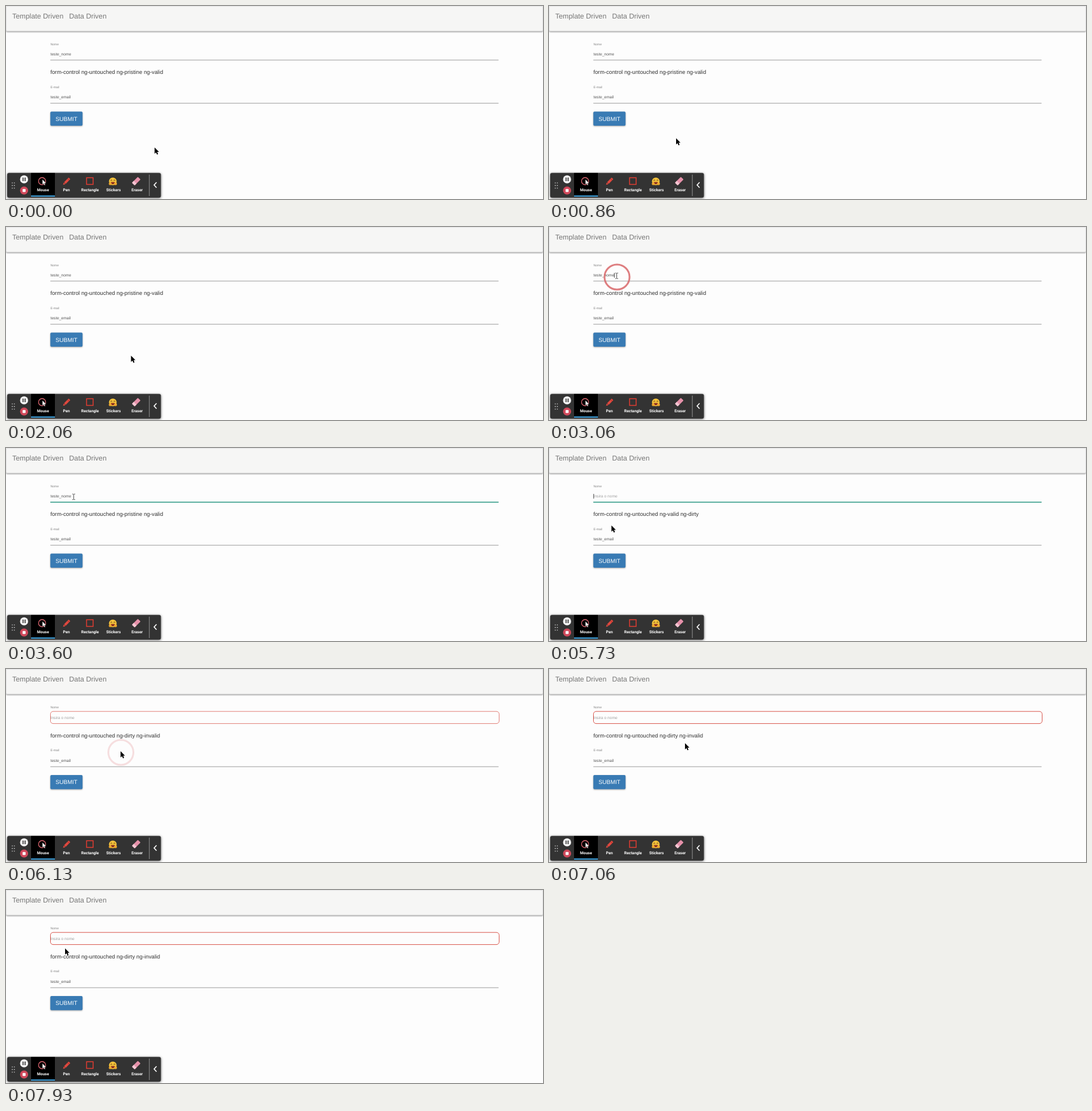
Animation, 900 px wide and 324 px high, one loop 8000 ms. Source, as an HTML page:

```html
<!DOCTYPE html>
<html lang="pt">
<head>
<meta charset="utf-8">
<title>Form states</title>
<style>
  html, body { margin: 0; width: 100%; height: 100%; overflow: hidden; background: #fdfdfd; }
  svg { display: block; width: 900px; height: 324px; }
  text { font-family: "Liberation Sans", Arial, sans-serif; text-rendering: geometricPrecision; white-space: pre; }
  .nav text { font-size: 11.88px; fill: #777; }
  .label { font-size: 5.28px; fill: #858585; }
  .field { font-size: 6.6px; fill: #555; }
  .status { font-size: 9.24px; fill: #333; }
  .tools text { font: bold 6.6px Roboto, sans-serif; fill: #fff; text-anchor: middle; }
  .panel { filter: drop-shadow(0 1px 2px #0009); }
  .button { filter: drop-shadow(0 1px 1px #0005); }
  .nav rect { filter: drop-shadow(0 1px 1.2px #0007); }
</style>
</head>
<body>
<svg viewBox="0 0 900 324">
  <defs>
    <path id="arrow" d="M0 0V10.4L2.4 8.2L4.1 11.9L5.9 11.1L4.3 7.5H7.4Z"/>
  </defs>
  <rect width="900" height="324" fill="#fdfdfd"/>
  <g class="nav">
    <rect x=".5" y=".5" width="899" height="41.5" rx="1.5" fill="#f6f6f5" stroke="#e3e3e3"/>
    <text x="10.5" y="21.1">Template Driven</text>
    <text x="105.8" y="21.1">Data Driven</text>
  </g>

  <text class="label" x="74.4" y="65.7">Nome</text>
  <text class="field" id="name" x="74.6" y="83.1"></text>
  <rect id="caret" y="77" width=".8" height="8" fill="#222"/>
  <rect id="line" x="74.3" y="90.3" width="751.2" height="1" fill="#9c9c9c"/>
  <rect id="focus" x="74.3" y="90.2" width="751.2" height="1.5" fill="#3aa692"/>
  <rect id="error" x="74.5" y="71.2" width="752" height="20.4" rx="4.5" fill="none" stroke="#d9564c"/>

  <g id="below">
    <text class="status" id="status" x="74.4" y="114.4"></text>
    <text class="label" x="74.4" y="137.7">E-mail</text>
    <text class="field" x="74.6" y="155.2">teste_email</text>
    <rect x="74.3" y="162.7" width="751.2" height="1" fill="#9c9c9c"/>
    <g class="button"><rect x="74.3" y="177.2" width="54" height="23.8" rx="2" fill="#397bb4"/></g>
    <text x="101.3" y="192.6" font-size="9.7" fill="#fff" text-anchor="middle">SUBMIT</text>
  </g>

  <g class="tools">
    <rect class="panel" x="2" y="280.3" width="257.6" height="41.5" rx="3" fill="#333"/>
    <path d="M10.5 297V306M14 297V306" stroke="#ddd" stroke-width="1.6" stroke-linecap="round" stroke-dasharray="0 4.4"/>
    <circle cx="30.3" cy="291" r="6.8" fill="#f5f5f5"/>
    <path d="M28.6 288V294M32 288V294" stroke="#333" stroke-width="1.6"/>
    <circle cx="30.3" cy="309.7" r="6.8" fill="#d0485a"/>
    <rect x="27.8" y="307.2" width="5" height="5" rx=".6" fill="#fff"/>
    <rect x="42" y="280.3" width="40" height="39.7" fill="#000"/>
    <rect x="42" y="318" width="40" height="2" fill="#3a9bd6"/>
    <circle cx="60.5" cy="294" r="6" fill="none" stroke="#dc6670" stroke-width="1.3"/>
    <use href="#arrow" transform="translate(61 291) scale(.85)" fill="#fff" stroke="#000" stroke-width=".5"/>
    <g transform="translate(101.5 294.3) rotate(45)">
      <rect x="-2" y="-7" width="4" height="11" rx=".8" fill="#e0483e"/>
      <path d="M-2 4.6H2L0 8.4Z" fill="#e0483e"/>
      <path d="M-2 -4.3H2" stroke="#8d2722" stroke-width=".8"/>
    </g>
    <rect x="135" y="288.3" width="11" height="11.2" fill="none" stroke="#df3d32" stroke-width="1.5"/>
    <g transform="translate(179 294.4)">
      <circle r="6.4" fill="#f5c33b"/>
      <path d="M-4 -1.2Q-2.5 -3.6 -1 -1.2M1.2 -1.2Q2.7 -3.6 4.2 -1.2" fill="none" stroke="#5b3518"/>
      <path d="M-3.6 1H3.6Q2.8 4.8 0 4.8T-3.6 1Z" fill="#8c2f22"/>
      <circle cx="-4.3" cy="4" r="2.4" fill="#efa72e"/>
      <circle cx="4.6" cy="4" r="2.4" fill="#efa72e"/>
    </g>
    <g transform="translate(218.3 294) rotate(-45)">
      <rect x="-7" y="-3.2" width="14" height="6.4" rx="1" fill="#e691aa"/>
      <path d="M-7 -2.2a1 1 0 0 1 1-1H-2.6V3.2H-6a1 1 0 0 1-1-1Z" fill="#f3c6d2"/>
    </g>
    <text x="62" y="311.3">Mouse</text>
    <text x="101.2" y="311.3">Pen</text>
    <text x="140.8" y="311.3">Rectangle</text>
    <text x="180.2" y="311.3">Stickers</text>
    <text x="219.7" y="311.3">Eraser</text>
    <path d="M240.2 283V319" stroke="#aaa" stroke-width=".8"/>
    <path d="M252.3 296L248.2 300.5L252.3 305" fill="none" stroke="#fff" stroke-width="1.6"/>
  </g>

  <circle id="ring" r="21" fill="none" stroke="#d9676a" stroke-width="3"/>
  <g id="pointer">
    <use id="hand" href="#arrow" stroke="#fff" stroke-width=".9" paint-order="stroke"/>
    <path id="beam" d="M-2.4 -4.8Q0 -4.8 0 -3.8Q0 -4.8 2.4 -4.8M0 -3.8V3.8M-2.4 4.8Q0 4.8 0 3.8Q0 4.8 2.4 4.8" fill="none" stroke="#444" stroke-width=".9"/>
  </g>
</svg>
<script>
const LOOP = 8000, STEP = 1000 / 15;
const VALUE = "teste_nome", FOCUS = 3066, BLUR = 6000;

// Pointer stops: time, x, y
const PATH = [
  [0, 249, 237.5], [333, 213, 222], [2000, 213, 222], [2067, 209.5, 216],
  [2267, 196, 206], [2467, 158, 172], [2667, 122, 100], [2800, 113.5, 82],
  [5533, 113.5, 82], [5733, 104.5, 130], [5933, 192, 138], [6867, 192, 138],
  [7067, 228, 124.5], [7200, 252, 124], [7400, 200, 122], [7733, 106, 106],
  [7933, 99, 98], [LOOP, 99, 98]
];

const $ = id => document.getElementById(id);
const set = (id, attrs) => { for (const key in attrs) $(id).setAttribute(key, attrs[key]); };
const ramp = (t, from, to) => Math.min(1, Math.max(0, (t - from) / (to - from)));
const within = (t, from, to) => t >= from && t < to;
const show = (id, on) => set(id, { opacity: +on });

function pointerAt(t) {
  const i = PATH.findIndex(stop => stop[0] > t);
  const [t0, x0, y0] = PATH[i - 1], [t1, x1, y1] = PATH[i];
  const p = ramp(t, t0, t1);
  return [x0 + (x1 - x0) * p, y0 + (y1 - y0) * p];
}

function lettersAt(t) {
  if (t < 4330) return 10;
  if (t < 4599) return 9;
  return Math.round(8 * (1 - ramp(t, 4600, 4933)));
}

function statusAt(t) {
  const state = t < 4599 ? "ng-pristine ng-valid"
    : t < BLUR - 1 ? "ng-valid ng-dirty" : "ng-dirty ng-invalid";
  return "form-control ng-untouched " + state;
}

function draw(t) {
  const count = lettersAt(t), typed = VALUE.slice(0, count);
  const blurred = t >= BLUR - 1;
  const name = $("name");
  name.textContent = typed || "Insira o nome";
  name.style.fill = typed ? "" : "#a0a0a0";
  set("name", { y: blurred ? 83.9 : 83.1 });
  set("caret", { x: 74.5 + (count && name.getComputedTextLength()) });
  show("caret", within(t, FOCUS, 3599) || within(t, 4132, 5132) || within(t, 5465, BLUR - 1));

  show("line", !blurred);
  set("focus", { opacity: ramp(t, FOCUS + 1, 3333) * (1 - ramp(t, BLUR - 67, 6133)) });
  set("error", { opacity: ramp(t, BLUR - 67, 6200) });
  $("status").textContent = statusAt(t);
  set("below", { transform: `translate(0 ${blurred ? .8 : 0})` });

  const [x, y] = pointerAt(t);
  const overText = within(y, 72, 92) || (within(y, 105, 117) && within(x, 74, 258));
  set("pointer", { transform: `translate(${x} ${y})` });
  show("hand", !overText);
  show("beam", overText);

  const click = t < 5000 ? FOCUS : 5932;
  set("ring", { cx: x + .5, cy: y + 2, opacity: t < click ? 0 : .85 * (1 - ramp(t, click, click + 266)) });
}

function tick() {
  const t = performance.now() % LOOP;
  draw(Math.min(LOOP - 1, Math.floor((t + 7) / STEP) * STEP));
  requestAnimationFrame(tick);
}
tick();
</script>
</body>
</html>
```
